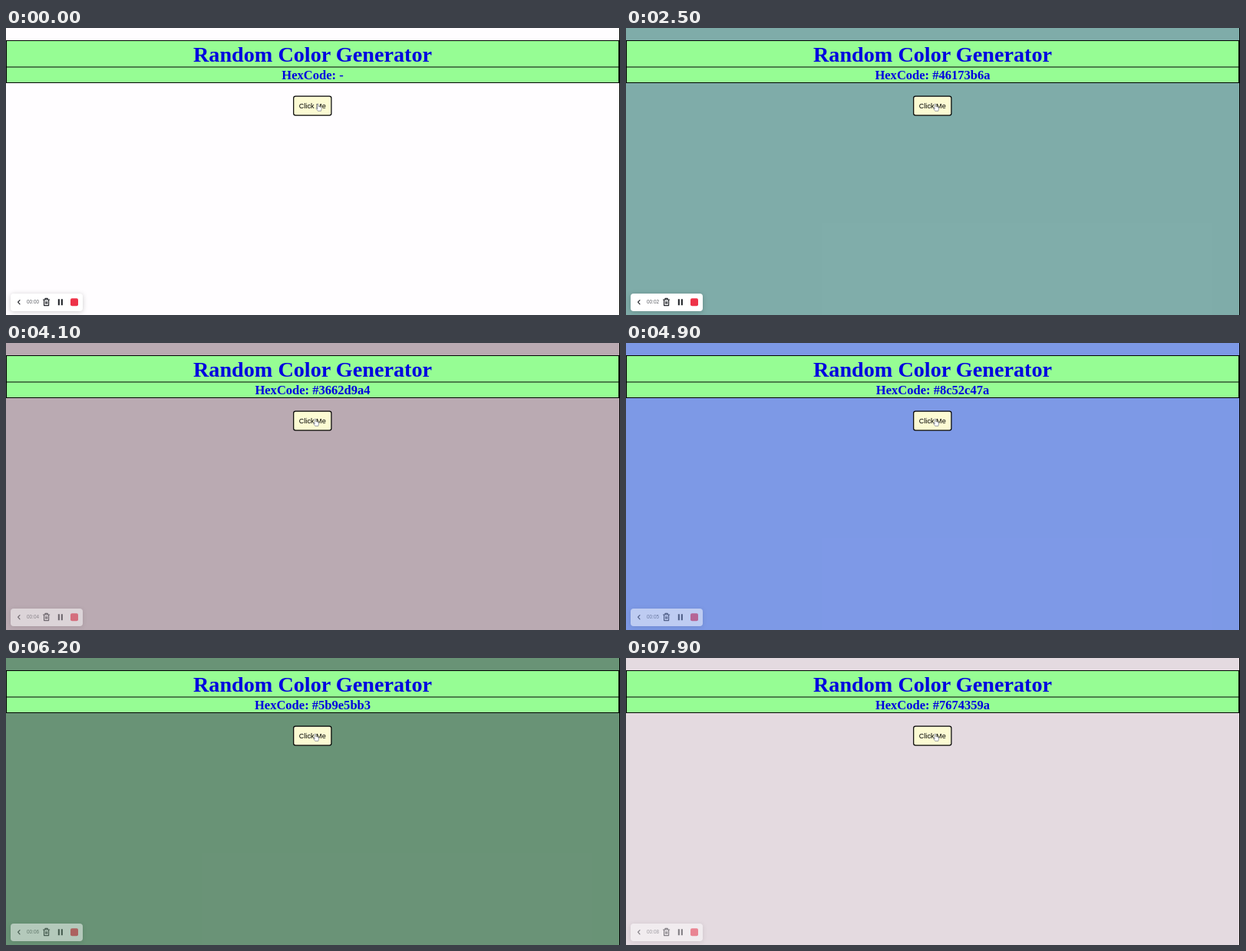
An HTML page for the animation above (8000 ms loop, 800 px wide and 375 px high).

```html
<!DOCTYPE html>
<html lang="en">
<head>
<meta charset="utf-8">
<title>Random Color Generator</title>
<style>
html, body { margin: 0; width: 100%; height: 100%; overflow: hidden; background: #fffdff; }
svg { display: block; width: 800px; height: 375px; }
.serif { font-family: "Liberation Serif", "Times New Roman", serif; font-weight: bold; fill: #0000e0; text-anchor: middle; }
.sans { font-family: "Liberation Sans", Arial, sans-serif; }
#bar { filter: drop-shadow(0 1px 3px rgba(0, 0, 0, .2)); }
.icon { fill: none; stroke: #24272c; stroke-width: 1.2; stroke-linecap: round; stroke-linejoin: round; }
</style>
</head>
<body>
<svg viewBox="0 0 800 375">
  <rect width="800" height="375" fill="#fffdff"/>
  <rect id="page" width="800" height="375"/>
  <path d="M799.5 0V375" stroke="#000"/>

  <path d="M.5 16.5H798.5V71.5H.5ZM.5 51H798.5" fill="#96fd94" stroke="#000" stroke-width="1.1"/>
  <text class="serif" x="399.5" y="44" font-size="28.2">Random Color Generator</text>
  <text class="serif" id="code" x="399.5" y="67" font-size="16.55"></text>

  <rect x="374.7" y="89.2" width="49.2" height="25" rx="2.6" fill="#fcfbd3" stroke="#000" stroke-width="1.2"/>
  <text class="sans" x="399.3" y="105" font-size="9.15" text-anchor="middle">Click Me</text>

  <g id="hand">
    <path d="M-1.2 3V-3.4Q-.3 -4.6 .5 -3.4V-.4L3.8 .4Q4.6 .8 4.4 2L3.7 5.5H-.4L-3 1.8Q-2.6 .6 -1.2 2Z"
      fill="#fff" stroke="#666a78" stroke-width=".6" stroke-linejoin="round"/>
  </g>

  <g id="bar">
    <rect x="6" y="347" width="94" height="23" rx="4" fill="#fff"/>
    <path class="icon" d="M18 355.6L15.6 358.2L18 360.8"/>
    <text class="sans" id="clock" x="35" y="360.4" font-size="6.4" text-anchor="middle" fill="#5c6066"></text>
    <path class="icon" d="M48.5 355H56.7M51 354.8V353.3H54.2V354.8M49.6 355.2V362.6H55.6V355.2M51.8 357.6V360.2M53.5 357.6V360.2"/>
    <path d="M67.8 354.2H69.9V362.3H67.8ZM71.8 354.2H73.9V362.3H71.8Z" fill="#24272c"/>
    <rect x="84" y="353.3" width="10" height="10" rx="2" fill="#ee3349"/>
  </g>
</svg>
<script>
const LOOP = 8000;

// Each click shows a new code and paints the page with the previous one.
const clicks = [
  [0, ''], [1500, '#015d5580'], [2100, '#46173b6a'], [2700, '#7270bf14'], [3300, '#2f011654'],
  [3800, '#3662d9a4'], [4500, '#8c52c47a'], [5100, '#809d9f08'], [5500, '#618d6ff1'],
  [6200, '#5b9e5bb3'], [6700, '#2d777658'], [7300, '#784e6433'], [7800, '#7674359a']
];

const el = id => document.getElementById(id);
const page = el('page'), code = el('code'), hand = el('hand'), bar = el('bar'), clock = el('clock');
const ramp = (t, from, to) => Math.min(1, Math.max(0, (t - from) / (to - from)));

function draw(now) {
  const t = Math.floor(now % LOOP / 100) * 100;
  const n = clicks.filter(([at]) => at <= t).length - 1;
  page.setAttribute('fill', n > 0 && clicks[n - 1][1] || 'none');
  code.textContent = 'HexCode: ' + (clicks[n][1] || '-');
  clock.textContent = '00:0' + Math.floor((t + 200) / 1000);
  bar.setAttribute('opacity', 1 - .5 * ramp(t, 3700, 4100));
  hand.setAttribute('transform', `translate(${406.8 - 3.6 * ramp(t, 300, 900)} 103)`);
  requestAnimationFrame(draw);
}
requestAnimationFrame(draw);
</script>
</body>
</html>
```
